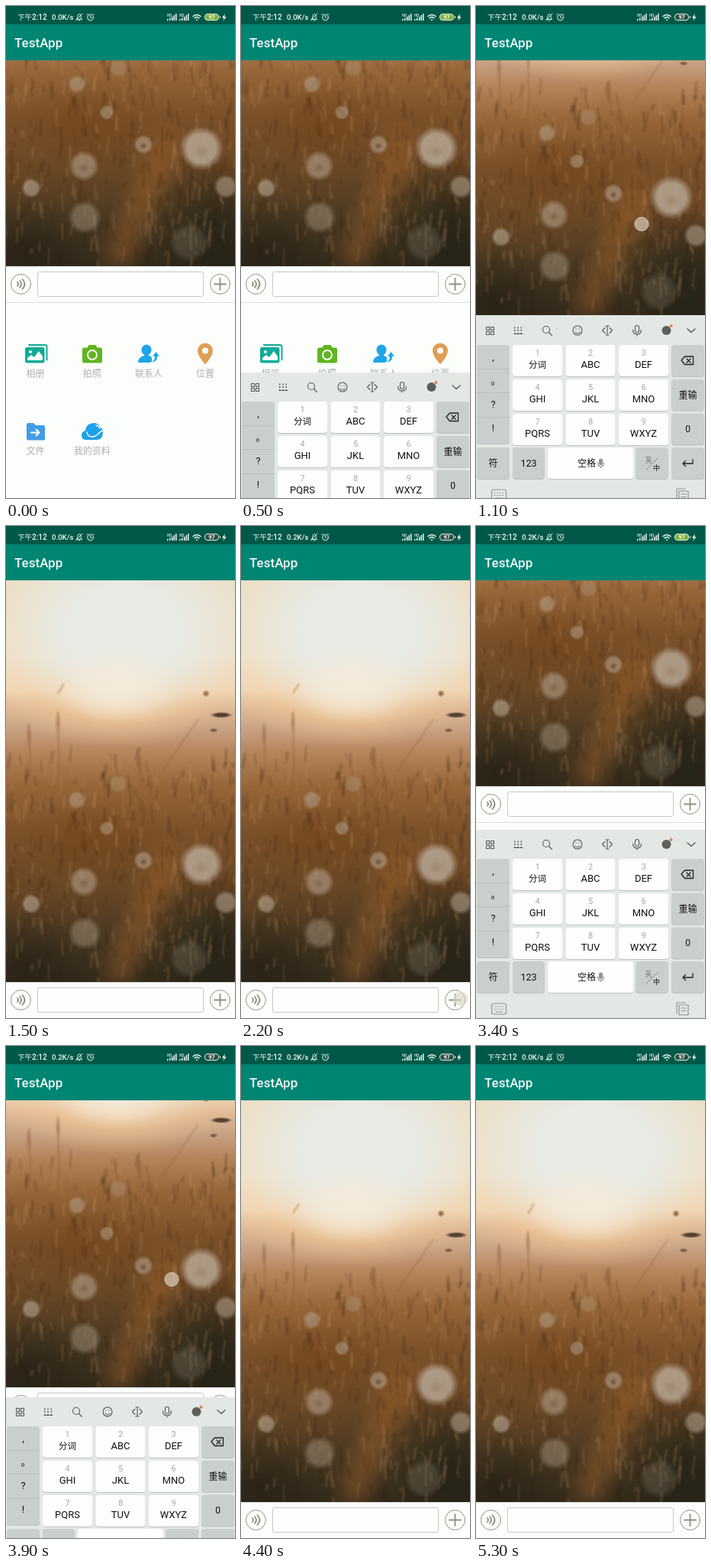
Animation, 300 px wide and 643 px high, one loop 5.4 s. Source, as an HTML page with a canvas:

```html
<!DOCTYPE html>
<html lang="zh">
<head>
<meta charset="utf-8">
<title>TestApp</title>
<style>
  html, body { margin: 0; width: 100%; height: 100%; overflow: hidden; background: #fcfefb; }
  #stage { position: relative; width: 300px; height: 643px; overflow: hidden; background: #fcfefb; }
  #stage > *, #page > * { position: absolute; left: 0; top: 0; display: block; }
  #page { width: 300px; height: 900px; }
  #page > #photo { top: 70px; }
  text { font-family: Roboto, "Noto Sans CJK SC", "Noto Sans CJK JP", "Noto Sans CJK", sans-serif; }
  .line { fill: none; stroke-linecap: round; stroke-linejoin: round; }
</style>
</head>
<body>
<div id="stage">
  <div id="page">
    <canvas id="photo" width="300" height="527"></canvas>
    <svg width="300" height="900">
      <g transform="translate(0 256)">
        <rect y="340" width="300" height="303" fill="#fcfefb"/>
        <path d="M0 340.5H300M0 387.5H300" stroke="#dde1dc"/>
        <rect x="41.5" y="347.5" width="217" height="32" rx="2.5" fill="#fdfffc" stroke="#c3ccc0"/>
        <g class="line" stroke="#8b937f">
          <circle cx="19.5" cy="363.5" r="13"/>
          <circle cx="280.5" cy="363.5" r="13"/>
          <path stroke-width="1.8" d="M280.5 356v15M273 363.5h15"/>
          <path stroke-width="1.8" d="M15 361q2 2.500 0 5M18 359q4 4.500 0 9M21.500 357q6 6.500 0 13"/>
        </g>
        <g id="panel">
          <g fill="#12aa98">
            <path d="M30 443h21q2.500 0 2.500 2.500v17" class="line" stroke="#12aa98" stroke-width="2"/>
            <rect x="25" y="446" width="25.500" height="20.500" rx="2.500"/>
            <path d="M28 463v-3l5-4 4 3 6-8 5 7v5z" fill="#fff"/>
            <circle cx="32" cy="452" r="2" fill="#fff"/>
          </g>
          <path d="M102.500 446.500h4l2-3.500h9l2 3.500h4q2.500 0 2.500 2.500v15q0 2.500-2.500 2.500h-21q-2.500 0-2.500-2.500v-15q0-2.500 2.500-2.500z" fill="#5fb51f"/>
          <circle cx="113" cy="456" r="6" fill="none" stroke="#fff" stroke-width="2"/>
          <g fill="#1fa5e9">
            <ellipse cx="184" cy="449.500" rx="6.500" ry="7"/>
            <path d="M173 466q0-7 8-9v-4h6v4q4 1 4 3v6z"/>
            <path d="M189 466q6-2 5.500-8h-3l5-6.500 5 6.500h-3q0 8-9.500 8z" stroke="#fcfefb" stroke-width=".8"/>
          </g>
          <path d="M261 468.500q-10-11.500-10-18a10 10 0 0 1 20 0q0 6.500-10 18z" fill="#e09d55"/>
          <circle cx="261" cy="450.500" r="4" fill="#fff"/>
          <path d="M27 547q0-2 2-2h7l3 3h10q2 0 2 2v15.500q0 2-2 2H29q-2 0-2-2z" fill="#429de5"/>
          <path d="M33 557.500h10M39.500 553.500l4 4-4 4" class="line" stroke="#fff" stroke-width="2"/>
          <path d="M105 567q-6 0-6-6 0-5 5-6 1-10 11-10 6 0 8 5 4 2 4 7 0 10-9 10z" fill="#1fa1e9"/>
          <path d="M106 557q1 6 7 6 4 0 8-4t6-4M118 548q4 1 5 4" class="line" stroke="#fff" stroke-width="1.500"/>
        </g>
      </g>
    </svg>
  </div>

  <svg id="keyboard" width="300" height="256">
    <rect width="300" height="256" fill="#e3e8e4"/>
    <g class="line" stroke="#555b57" stroke-width="1.100">
      <path d="M13.500 14.500h4v4h-4zM19.500 14.500h4v4h-4zM13.500 20.500h4v4h-4zM19.500 20.500h4v4h-4z"/>
      <path d="M50 15.500h10M50 19h10M50 23h10" stroke-width="2" stroke-dasharray="1.500 2.800" stroke-linecap="butt"/>
      <path d="M50 23.500h11"/>
      <circle cx="92" cy="18" r="4.500"/><path d="M95.500 21.500l4 4"/>
      <circle cx="133" cy="19" r="6"/><path d="M130 21q3 3.500 6 0M131 17v.5M135 17v.5"/>
      <path d="M172 13v12M169 15.500l-3.500 3.500 3.500 3.500M175 15.500l3.500 3.500-3.500 3.500M170 13h4M170 25h4"/>
      <rect x="208.500" y="12.500" width="5" height="9" rx="2.500"/>
      <path d="M205.500 18q0 6 5.500 6t5.500-6M211 24v2"/>
      <path d="M277 17l5 4.500 5-4.500" stroke-width="1.400"/>
    </g>
    <circle cx="249.500" cy="19" r="6" fill="#5d605a"/>
    <circle cx="255.500" cy="13" r="2" fill="#d9854c"/>
    <g id="keys"></g>
    <path d="M1 69.500h43M1 100.500h43M1 132.500h43" stroke="#b9c0bd"/>
    <g class="line" stroke="#222" stroke-width="1.300">
      <path d="M269 58l4.500-5h11v10.500h-11zM276 56l5 5M281 56l-5 5"/>
      <path d="M284 188v5h-13M274.500 189.500l-3.500 3.500 3.500 3.500"/>
      <path d="M223 201l15-15" stroke="#777" stroke-width=".8"/>
    </g>
    <g class="line" stroke="#8f9792" stroke-width="1.200">
      <rect x="161.500" y="187" width="4" height="7.500" rx="2" fill="#8f9792"/>
      <path d="M159.500 192q0 5 4 5t4-5M163.500 197v1.500"/>
      <rect x="20.500" y="227" width="19" height="14" rx="3"/>
      <path d="M24 231h12M24 234.500h12" stroke-dasharray="1 2.600"/>
      <path d="M26 238h8M263 240v-14h11M266 229h12v13h-12zM269 233h6M269 236.500h6"/>
    </g>
  </svg>

  <svg id="top" width="300" height="643">
    <circle id="touch" r="9" fill="#ddd5c8" fill-opacity=".65" stroke="#eee9df" stroke-opacity=".7"/>
    <rect width="300" height="71" fill="#008573"/>
    <rect width="300" height="24" fill="#005948"/>
    <g fill="#f2f8f4" font-weight="500">
      <text x="11" y="54" font-size="17">TestApp</text>
      <text x="15" y="18" font-size="9.500">下午</text>
      <text x="34" y="18" font-size="10">2:12</text>
      <text id="speed" x="60" y="18" font-size="9.600"></text>
      <path d="M211 19v-2h1.500v2zM214 19v-3.500h1.500V19zM217 19v-5h1.500v5zM219.500 19v-7h1.500v7zM222 19v-9h1.500v9z"/>
      <path d="M227 19v-2h1.500v2zM230 19v-3.500h1.500V19zM233 19v-5h1.500v5zM235.500 19v-7h1.500v7zM238 19v-9h1.500v9z"/>
      <text x="211" y="13.500" font-size="4.500">HD</text>
      <text x="227" y="13.500" font-size="4.500">HD</text>
      <path d="M287 10l-4 5.500h2.500l-1 4 4-5.500H286z"/>
    </g>
    <g class="line" stroke="#e9f3ee">
      <path d="M92.500 17.500h7q-1.500-1.500-1.500-4t-2-3q-2 .5-2 3t-1.500 4M91.500 19l8.500-9M95.500 19h1"/>
      <circle cx="110.500" cy="15" r="3.800"/>
      <path d="M110.500 13v2l1.500 1M106 11.500l1.500-1.500M115 11.500l-1.500-1.500"/>
      <path d="M245 13.500q5-4 10 0M247 15.800q3-2.500 6 0M249.500 18h1" stroke-width="1.500"/>
      <rect id="battery" x="260.500" y="10.500" width="18" height="8" rx="3.500"/>
      <path d="M280.500 13.500v2"/>
    </g>
    <text x="269.500" y="17.200" font-size="7.500" font-weight="700" text-anchor="middle" fill="#fff">97</text>
  </svg>
</div>

<script>
const $ = id => document.getElementById(id);
const clamp = u => Math.min(1, Math.max(0, u));
const swing = u => (1 - Math.cos(Math.PI * clamp(u))) / 2;
const out = u => 1 - (1 - clamp(u)) ** 2;
const TRAVEL = 256;

function add(parent, tag, attrs, content = '') {
  const el = document.createElementNS('http://www.w3.org/2000/svg', tag);
  for (const k in attrs) el.setAttribute(k, attrs[k]);
  el.textContent = content;
  parent.append(el);
}

function label(parent, s, x, y, size, fill) {
  add(parent, 'text', { x, y, fill, 'font-size': size, 'text-anchor': 'middle' }, s);
}

function key(x, y, width, fill, height = 41) {
  add($('keys'), 'rect', { x, y: y + 1, width, height, rx: 4, fill: '#bcc3bf' });
  add($('keys'), 'rect', { x, y, width, height, rx: 4, fill });
}

function buildPanel() {
  ['相册', '拍照', '联系人', '位置', '文件', '我的资料'].forEach((s, i) =>
    label($('panel'), s, 38.5 + (i % 4) * 74.2, i < 4 ? 485 : 586, 12, '#acb1aa'));
}

function buildKeys() {
  const white = '#fdfffd', grey = '#c9cfcd', ink = '#111', keys = $('keys');
  key(1, 38, 43, grey, 129);
  [',', '。', '?', '!'].forEach((s, i) => label(keys, s, s === '。' ? 26 : 22.5, 58 + i * 31, 13, ink));
  ['分词', 'ABC', 'DEF', 'GHI', 'JKL', 'MNO', 'PQRS', 'TUV', 'WXYZ'].forEach((s, i) => {
    const x = 48 + (i % 3) * 69.5, y = 38 + Math.floor(i / 3) * 45;
    key(x, y, 65, white);
    label(keys, i + 1, x + 32.5, y + 14, 11, '#a3a9a5');
    label(keys, s, x + 32.5, y + 29.5, i ? 13 : 11.5, ink);
  });
  ['', '重输', '0', ''].forEach((s, i) => {
    const y = 38 + i * 44.7;
    key(256, y, 43, grey);
    label(keys, s, 277.5, y + 25, 12, ink);
  });
  key(1, 172, 43, grey);
  key(48, 172, 42, grey);
  key(94, 172, 112, white);
  key(209, 172, 43, grey);
  label(keys, '符', 22.5, 197, 12, ink);
  label(keys, '123', 69, 197, 12.5, ink);
  label(keys, '空格', 145, 197, 12, ink);
  label(keys, '英', 226, 192, 9, '#777');
  label(keys, '中', 236.5, 202, 9, ink);
}

function paintPhoto() {
  const c = $('photo').getContext('2d');
  let seed = 7;
  const rnd = () => (seed = seed * 16807 % 2147483647) / 2147483647;
  c.translate(0, -70);

  function blob(x, y, rx, ry, rgb, alpha, core = 0) {
    const g = c.createRadialGradient(0, 0, 0, 0, 0, 1);
    g.addColorStop(core, `rgba(${rgb},${alpha})`);
    g.addColorStop(1, `rgba(${rgb},0)`);
    c.save();
    c.translate(x, y);
    c.scale(rx, ry);
    c.fillStyle = g;
    c.fillRect(-1, -1, 2, 2);
    c.restore();
  }

  function stroke(x1, y1, x2, y2, width, style) {
    c.strokeStyle = style;
    c.lineWidth = width;
    c.beginPath();
    c.moveTo(x1, y1);
    c.lineTo(x2, y2);
    c.stroke();
  }

  // Sky and field
  const base = c.createLinearGradient(0, 70, 0, 597);
  [[70, '#ebdfc8'], [170, '#efe0c8'], [215, '#f0d5b2'], [240, '#dfb894'], [265, '#c9a283'],
   [295, '#b5855c'], [340, '#976639'], [400, '#7b5029'], [470, '#6a4724'],
   [530, '#4c3a22'], [597, '#332a1b']].forEach(([y, col]) => base.addColorStop((y - 70) / 527, col));
  c.fillStyle = base;
  c.fillRect(0, 70, 300, 527);
  blob(145, 235, 140, 55, '250,208,155', .8);
  blob(155, 135, 165, 125, '232,234,228', 1, .45);
  blob(145, 205, 85, 50, '244,234,218', .9, .3);

  // Dark and sunlit patches
  blob(30, 575, 90, 75, '30,28,20', .55);
  blob(275, 560, 85, 110, '32,32,22', .7, .2);
  blob(110, 410, 90, 60, '112,62,18', .4);
  for (let u = 0; u <= 1; u += .2) blob(148 + 60 * u, 580 - 140 * u, 34, 42, '160,98,44', .36);

  // Grass
  c.filter = 'blur(1.2px)';
  for (let i = 0; i < 420; i++) {
    const x = rnd() * 300, y = 305 + rnd() * 300, h = 5 + rnd() * 22;
    stroke(x, y, x + rnd() * 8 - 4, y - h, 1.5 + rnd() * 3,
      rnd() < .5 ? 'rgba(190,145,98,.2)' : 'rgba(48,30,14,.2)');
  }
  [[30, 258, 330], [68, 242, 345], [175, 298, 370], [270, 325, 400]].forEach(([x, a, b]) => {
    stroke(x, a, x + 2, b, 2, 'rgba(140,90,50,.4)');
    blob(x, a + 15, 4, 16, '145,95,58', .45);
  });
  stroke(76, 206, 68, 219, 3, 'rgba(205,150,100,.6)');
  stroke(252, 252, 205, 320, 2, 'rgba(135,90,55,.3)');
  c.filter = 'none';

  // Birds and seed heads
  blob(282, 247, 15, 4, '78,58,45', .95, .5);
  blob(262, 219, 5, 5, '150,100,65', .9, .3);
  blob(272, 267, 6, 3, '110,75,52', .8, .4);
  [[256, 442, 29, .85], [102, 465, 20, .55], [180, 437, 13, .55], [288, 492, 16, .55], [33, 494, 13, .6],
   [93, 358, 12, .5], [132, 395, 10, .5], [103, 532, 22, .4], [147, 337, 12, .3], [240, 565, 26, .2]]
    .forEach(([x, y, r, a]) => blob(x, y, r, r, '182,166,146', a, .65));
  blob(256, 446, 10, 9, '142,116,88', .45);
  blob(102, 467, 7, 7, '110,80,52', .5);
  blob(180, 439, 5, 5, '85,62,42', .7);
}

function touchAt(t) {
  if (t >= 900 && t < 1200) return [217, 285];
  if (t >= 2100 && t < 2300) return [288, 618];
  if (t >= 3700 && t < 4000) return [217, 305];
}

function draw(t) {
  const lift = 1 - swing((t - 989) / 333) + out((t - 2250) / 200) - swing((t - 3752) / 333);
  const rise = out((t - 400) / 250) - swing((t - 1066) / 200)
             + out((t - 3200) / 250) - swing((t - 3829) / 200);
  const panel = t < 650 || (t >= 2250 && t < 3450);
  const touch = touchAt(t);

  $('page').style.transform = `translateY(${Math.round(-TRAVEL * lift)}px)`;
  $('keyboard').style.transform = `translateY(${Math.round(643 - TRAVEL * rise)}px)`;
  $('panel').style.display = panel ? '' : 'none';
  $('battery').style.fill = panel ? '#7fae35' : '#2c4a3f';
  $('speed').textContent = t >= 1900 && t < 4900 ? '0.2K/s' : '0.0K/s';
  $('touch').style.display = touch ? '' : 'none';
  if (touch) $('touch').setAttribute('transform', `translate(${touch})`);
}

// The screen is refreshed ten times a second
function tick() {
  draw(Math.floor(performance.now() % 5400 / 100) * 100);
  requestAnimationFrame(tick);
}

buildPanel();
buildKeys();
paintPhoto();
tick();
</script>
</body>
</html>
```
